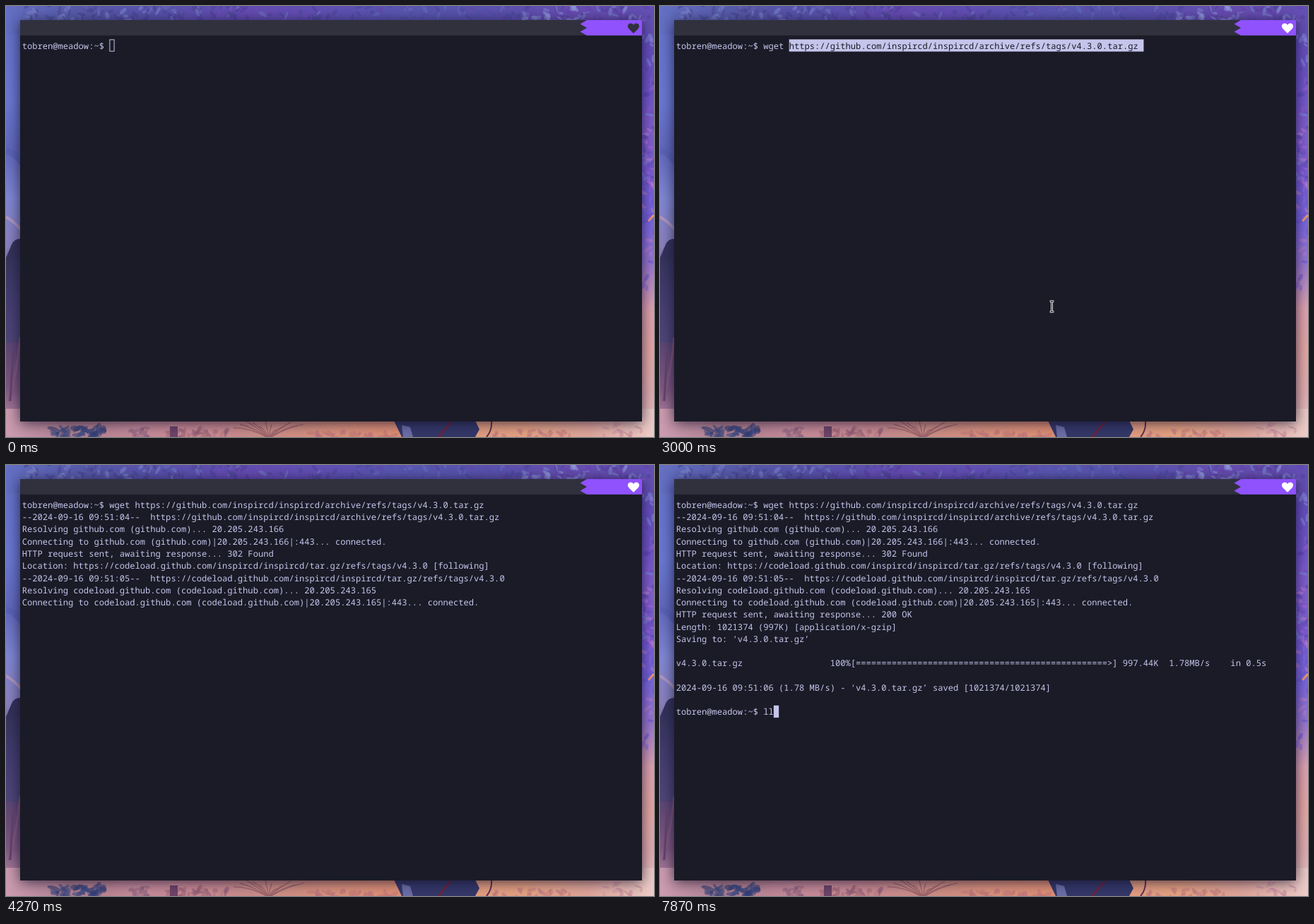
These frames come from a looping animation (917 by 611 pixels, 8 s). An HTML page with a canvas:

```html
<!DOCTYPE html>
<html lang="en">
<head>
<meta charset="utf-8">
<title>Terminal download</title>
<style>
  html, body { margin: 0; width: 100%; height: 100%; overflow: hidden; background: #5a55a8; }
  #wall, #ui { position: absolute; left: 0; top: 0; width: 917px; height: 611px; display: block; }
  #win { position: absolute; left: 20px; top: 20px; width: 880px; height: 569px;
    background: #1a1b26; box-shadow: 0 2px 18px rgba(14, 12, 38, .74); }
  text { font: 12.12px "Noto Sans Mono", "DejaVu Sans Mono", monospace; white-space: pre;
    text-rendering: geometricPrecision; font-variant-ligatures: none; fill: #c5c5ec; }
</style>
</head>
<body>
<canvas id="wall" width="917" height="611"></canvas>
<div id="win"></div>
<svg id="ui" viewBox="0 0 917 611">
  <rect x="20" y="20" width="880" height="21.7" fill="#30313d"/>
  <path d="M822 20 L812.5 25.5 L822 31 L812.5 36.4 L822 41.7 H900 V20 Z" fill="#8f52fd"/>
  <path id="heart" d="M888 38.8 L881.6 32.6 C878.2 29 880.4 24.6 884 24.6 C886 24.6 887.4 25.8 888 27.2 C888.6 25.8 890 24.6 892 24.6 C895.6 24.6 897.8 29 894.4 32.6 Z"/>
  <rect id="block" fill="#c5c5ec"/>
  <g id="rows"></g>
  <text id="picked" style="fill:#1a1b26"></text>
  <g id="mouse" fill="none">
    <path d="M-2.8 -7.4 H2.8 M0 -7.4 V7.4 M-2.8 7.4 H2.8" stroke="#fff" stroke-width="2.8"/>
    <path d="M-2.5 -7.4 H2.5 M0 -7.4 V7.4 M-2.5 7.4 H2.5" stroke="#1a1b26" stroke-width="1"/>
  </g>
</svg>
<script>
const LOOP = 8000, CW = 7.272, CH = 17.27, X0 = 22.7, Y0 = 47.3, BASE = 13.6;
const $ = id => document.getElementById(id);

// ---------- wallpaper ----------
const g = $('wall').getContext('2d');
let seed = 11;
const rnd = () => (seed = (seed * 16807) % 2147483647) / 2147483647;
const between = (a, b) => a + rnd() * (b - a);

function strip(x, y, w, h, across, stops) {
  const grad = g.createLinearGradient(x, y, across ? x + w : x, across ? y : y + h);
  stops.split(' ').forEach((c, i, all) => grad.addColorStop(i / (all.length - 1), c));
  g.fillStyle = grad;
  g.fillRect(x, y, w, h);
}

function leaves(n, x0, y0, x1, y1, size, colors) {
  const list = colors.split(' ');
  g.globalAlpha = .6;
  for (let i = 0; i < n; i++) {
    g.fillStyle = list[Math.floor(rnd() * list.length)];
    g.beginPath();
    g.ellipse(between(x0, x1), between(y0, y1), size * between(.6, 1.4), size * between(.25, .6),
      between(0, Math.PI), 0, 7);
    g.fill();
  }
  g.globalAlpha = 1;
}

function shape(color, d) {
  g.fillStyle = color;
  g.fill(new Path2D(d));
}

function line(color, width, d) {
  g.strokeStyle = color;
  g.lineWidth = width;
  g.stroke(new Path2D(d));
}

function paintWall() {
  strip(0, 0, 40, 611, false, '#6470c4 #6674cc #6a78d0 #6068bc #8088d4 #8a80bc #4f4678 #5c4674 #7e5880 #cc9cb0');
  strip(877, 0, 40, 611, false, '#6552b8 #664fbe #7256cc #8560d0 #785cd8 #7a66e0 #9a78d0 #dfa3b0 #e6a8a4 #e2aeb0 #ecccc8');
  strip(0, 0, 917, 40, true, '#6470c4 #5658a8 #5a52ae #644cb2 #6050b4 #5858b0 #5a52ae #684eb2 #6450b4');
  strip(0, 571, 917, 40, true, '#cc9cb0 #b0808f #c48a98 #c98a94 #c98c86 #d8917c #de8f76 #e39a7e #e4a282 #dfa59a #ecccc8');

  leaves(70, 25, 0, 240, 20, 5, '#47458f #4f4a9a #6468b4 #7c86cc');
  leaves(60, 230, 0, 480, 20, 5, '#563ea0 #6a4eb8 #4c4898 #747ac4');
  leaves(60, 470, 0, 740, 20, 5, '#4a4a9c #5850a8 #646abc #6448ac');
  leaves(65, 730, 0, 917, 20, 5, '#6644b0 #53459c #7c84d0 #929ce0');
  leaves(50, 901, 20, 917, 250, 5, '#5f48b8 #7050c8 #8288dc #8c5ed0');
  leaves(14, 903, 170, 917, 260, 4, '#c07ad8 #a968dc');
  leaves(22, 901, 250, 917, 400, 5, '#6e56d8 #8a6ae0 #b880cc');
  line('#ef9a70', 3, 'M909 305 L917 296');

  line('#5a64b8', 9, 'M-2 205 Q12 206 22 222');
  line('#b098c0', 4, 'M-2 298 Q10 304 22 318');
  shape('#34325a', 'M0 357 L8 338 Q12 329 22 330 V400 H0 Z');
  strip(0, 357, 22, 120, false, '#36345c #443e70 #4f4678');
  line('#835a80', 3, 'M20 470 Q16 520 4 560');
  line('#66446c', 3, 'M10 490 L6 560');

  leaves(34, 66, 598, 142, 614, 7, '#303c72 #3c4a84 #485080');
  leaves(16, 175, 598, 205, 613, 5, '#8a5f7e #9a6a82');
  leaves(30, 225, 601, 320, 613, 6, '#8f5c74 #a56d7a #b57a80');
  shape('#6d4468', 'M232 611 V596 H243 V611 Z');
  for (let x = 322; x < 430; x += 9)
    line('#9a6268', 1.2, `M372 613 Q${(x + 372) / 2} 598 ${x} ${between(588, 602)}`);
  leaves(20, 430, 604, 550, 613, 6, '#c47a74 #b9707a');
  leaves(24, 690, 602, 800, 613, 5, '#cd8278 #c07a80');
  leaves(14, 835, 590, 900, 612, 5, '#c98a9c #d49aa4');

  // plain figure behind the window
  shape('#343868', 'M549 588 H664 L670 600 L664 611 H560 Z');
  shape('#6b6ea6', 'M560 594 L572 597 L576 611 H562 Z');
  line('#6c2440', 3, 'M612 611 L630 589');
  line('#5a3450', 2, 'M687 588 Q688 602 680 611');
}

// ---------- terminal ----------
const PS1 = 'tobren@meadow:~$ ';
const URL1 = 'https://github.com/inspircd/inspircd/archive/refs/tags/v4.3.0.tar.gz';
const FILE = 'v4.3.0.tar.gz';

// '\r' rewrites the current line
function bar(pct, size, rate, tail = '') {
  const n = Math.floor(pct / 2);
  const fill = n ? '='.repeat(n - 1) + '>' : '';
  return ('\r' + FILE.padEnd(30) + (pct + '%').padStart(4) + '[' + fill.padEnd(50) + ']' +
    size.padStart(8) + '  ' + rate + tail).padEnd(120);
}

const output = [
  [0, PS1],
  [1870, 'w'], [1930, 'g'], [2070, 'e'], [2130, 't'], [2200, ' '],
  [3000, URL1],
  [3470, `\n--2024-09-16 09:51:04--  ${URL1}\nResolving github.com (github.com)... `],
  [3530, '20.205.243.166\nConnecting to github.com (github.com)|20.205.243.166|:443... '],
  [3600, 'connected.\n'],
  [3730, 'HTTP request sent, awaiting response... '],
  [4070, '302 Found\nLocation: https://codeload.github.com/inspircd/inspircd/tar.gz/refs/tags/v4.3.0 [following]\n' +
    '--2024-09-16 09:51:05--  https://codeload.github.com/inspircd/inspircd/tar.gz/refs/tags/v4.3.0\n' +
    'Resolving codeload.github.com (codeload.github.com)... '],
  [4130, '20.205.243.165\nConnecting to codeload.github.com (codeload.github.com)|20.205.243.165|:443... '],
  [4200, 'connected.\n'],
  [4330, 'HTTP request sent, awaiting response... '],
  [4670, `200 OK\nLength: 1021374 (997K) [application/x-gzip]\nSaving to: ‘${FILE}’\n\n` + bar(0, '0', '--.-KB/s')],
  [4930, bar(25, '257.74K', '1.25MB/s')],
  [5070, bar(74, '738.10K', '1.72MB/s')],
  [5200, bar(100, '997.44K', '1.78MB/s', '    in 0.5s') +
    `\n\n2024-09-16 09:51:06 (1.78 MB/s) - ‘${FILE}’ saved [1021374/1021374]\n\n` + PS1],
  [6730, 'l'], [6800, 'l']
];
const FOCUS = 1130, PASTE = [3000, 3470];
const blink = [1670, 1870, 4070, 4530, 5070, 5600, 6070, 6530, 7400, 7870];
const path = [[670, 640, 598], [730, 612, 540], [800, 580, 470], [870, 560, 436], [930, 554, 426], [4070, 554, 426]];

const rows = Array.from({ length: 18 }, (_, i) => {
  const el = document.createElementNS('http://www.w3.org/2000/svg', 'text');
  el.setAttribute('x', X0);
  el.setAttribute('y', Y0 + BASE + i * CH);
  $('rows').append(el);
  return el;
});

function set(el, attrs) {
  for (const k in attrs) el.setAttribute(k, attrs[k]);
}

function screenAt(t) {
  const all = output.filter(o => o[0] <= t).map(o => o[1]).join('');
  return all.split('\n').map(l => l.slice(l.lastIndexOf('\r') + 1));
}

function mouseAt(t) {
  const i = path.findIndex(p => p[0] > t);
  if (i < 1) return null;
  const a = path[i - 1], b = path[i], k = (t - a[0]) / (b[0] - a[0]);
  return [a[1] + (b[1] - a[1]) * k, a[2] + (b[2] - a[2]) * k];
}

function draw(t) {
  const lines = screenAt(t), row = lines.length - 1, len = lines[row].length;
  const col = Math.min(len, 119), focus = t >= FOCUS;
  const picked = t >= PASTE[0] && t < PASTE[1];
  const start = len - URL1.length;
  rows.forEach((el, i) => {
    const s = picked && i === row ? lines[i].slice(0, start) : lines[i] || '';
    if (el.textContent !== s) el.textContent = s;
  });
  $('picked').textContent = picked ? URL1 : '';
  set($('picked'), { x: X0 + start * CW, y: Y0 + BASE });

  const on = picked || blink.filter(b => b <= t).length % 2 === 0;
  const inset = focus ? 0 : .5;
  set($('block'), {
    x: X0 + (picked ? start : col) * CW + inset,
    y: Y0 + row * CH + inset,
    width: (picked ? URL1.length + 1 : 1) * CW - 2 * inset,
    height: CH - 2 * inset,
    fill: focus ? '#c5c5ec' : 'none',
    stroke: focus ? 'none' : '#c5c5ec',
    visibility: on ? 'visible' : 'hidden'
  });
  set($('heart'), { fill: focus ? '#fff' : '#30313d' });

  const m = mouseAt(t);
  set($('mouse'), {
    visibility: m ? 'visible' : 'hidden',
    transform: m ? `translate(${m[0] + .5} ${m[1]})` : ''
  });
}

paintWall();
const begin = performance.now();
function tick() {
  draw((performance.now() - begin) % LOOP);
  requestAnimationFrame(tick);
}
tick();
</script>
</body>
</html>
```
